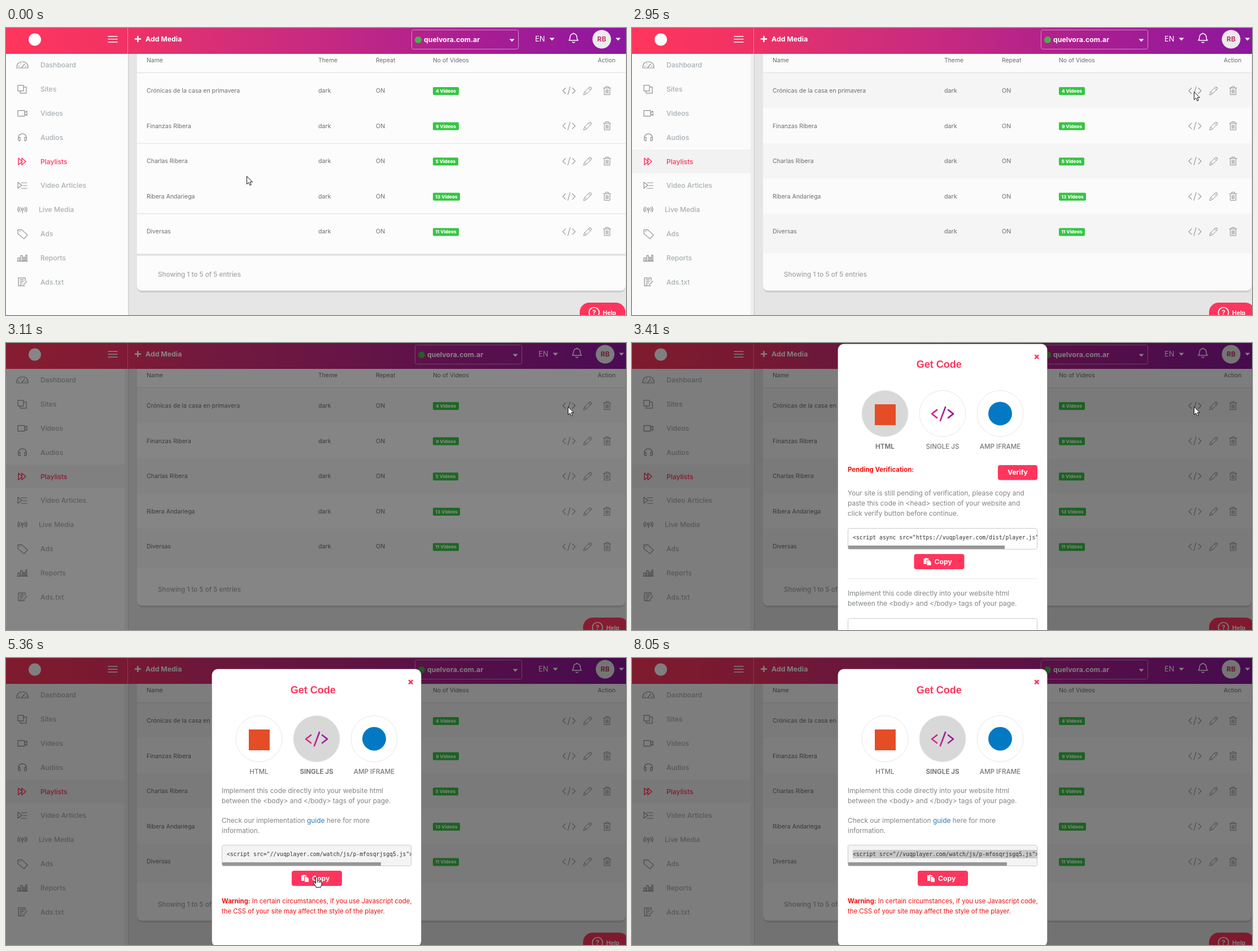
An HTML page for the animation above (8.33 s loop, 1098 px wide and 510 px high).

```html
<!DOCTYPE html>
<html lang="en">
<head>
<meta charset="utf-8">
<title>Playlists</title>
<style>
  html, body { margin: 0; width: 100%; height: 100%; overflow: hidden; background: #e6e6e6; }
  svg { display: block; width: 1098px; height: 510px; font-family: Inter, "Open Sans", sans-serif; }
  text { white-space: pre; }
  .ln { fill: none; stroke-linecap: round; stroke-linejoin: round; }
</style>
</head>
<body>
<svg id="stage" viewBox="0 0 1098 510"></svg>
<script>
const LOOP = 8330;
const RED = '#ff355d', GREY = '#8f9193';

const text = (x, y, s, size, fill, weight = 400, extra = '') =>
  `<text x="${x}" y="${y}" font-size="${size}" fill="${fill}" font-weight="${weight}" ${extra}>${s}</text>`;
const rect = (x, y, w, h, fill, r = 0, extra = '') =>
  `<rect x="${x}" y="${y}" width="${w}" height="${h}" fill="${fill}" rx="${r}" ${extra}/>`;
const line = (d, stroke = GREY, w = 1.2) =>
  `<path class="ln" d="${d}" stroke="${stroke}" stroke-width="${w}"/>`;
const disc = (x, y, r, fill, extra = '') =>
  `<circle cx="${x}" cy="${y}" r="${r}" fill="${fill}" ${extra}/>`;
const at = (x, y, s) => `<g transform="translate(${x} ${y})">${s}</g>`;
const group = (id, s) => `<g id="${id}">${s}</g>`;
const caret = (x, y) => `<path d="M${x - 4.5} ${y - 2.5}h9l-4.5 5z" fill="#fff"/>`;
const MID = 'text-anchor="middle"';

// Sidebar: label and icon strokes around the icon centre
const menu = [
  ['Dashboard', 'M-10 5q0-11 10-11t10 11zM-1 4l5-6M-7 2h2M5 2h2M-3-3v1'],
  ['Sites', 'M-8-7h10v10h-10zM-4 3v4h11v-11h-5'],
  ['Videos', 'M-8-5h12v10h-12zM4-1l4-3v8l-4-3'],
  ['Audios', 'M-7 3v-3a7 6.500 0 0 1 14 0v3M-7 0h3v6h-2q-2-1-1-6M7 0h-3v6h2q2-1 1-6'],
  ['Playlists', 'M-7-6v12l7-6zM-1-6l7 6-7 6M-1-6v5M-1 1v5'],
  ['Video Articles', 'M-8-6v11l7-5.500zM-2-5h10M1 0h7M-2 5h10'],
  ['Live Media', 'M0 0v6M-2-1a2 2 0 1 1 4 0a2 2 0 1 1-4 0M-4-4q-2.500 4 0 7M4-4q2.500 4 0 7M-6.500-5q-3 5 0 9M6.500-5q3 5 0 9'],
  ['Ads', 'M-8-7l7 0 10 9-6 7-11-9zM-5-4h1'],
  ['Reports', 'M-9 6h18M-8 6v-6h3v6M-3 6v-10h3v10M2 6v-7h2v7M6 6v-11h2v11'],
  ['Ads.txt', 'M5-2v-5h-12v14h11M-4-4h6M-4-1h6M-4 2h4M-4 5h2M2 5l6-6']
];
const sidebar = menu.map(([label, icon], i) => {
  const y = 66 + 42.8 * i, on = i === 4;
  return at(29, y, line(icon, on ? RED : GREY, on ? 1.5 : 1.2)) +
    text(i === 6 ? 58 : 61, y + 4.3, label, 12.1, on ? RED : '#a9b0b4', 500);
}).join('');

const rows = [
  ['Crónicas de la casa en primavera', 4, 46],
  ['Finanzas Ribera', 9, 46],
  ['Charlas Ribera', 5, 45],
  ['Ribera Andariega', 13, 48],
  ['Diversas', 11, 46]
];
const actions =
  line('M991-5l-5 5 5 5M1003-5l5 5-5 5M999-7l-4 14', GREY, 1.1) +
  line('M1023 7l1.500-5 9-9 3.500 3.500-9 9zM1031.500-5l3.500 3.500M1025 2l3 3M1035-7l2 2', GREY, 1) +
  line('M1058-5h13M1062-5v-2.500h5v2.500M1059.500-5v12h10v-12M1062.500-2v6.500M1064.500-2v6.500M1066.500-2v6.500', GREY, 1);
const table = rows.map(([name, n, w], i) => at(0, 111.5 + 62.6 * i,
  text(249, 3.5, name, 10.5, '#6d6d6d') +
  text(553, 3.5, 'dark', 10.7, '#6d6d6d') +
  text(655, 3.5, 'ON', 10.7, '#6d6d6d') +
  rect(756, -6.5, w, 14, '#36c643', 2) +
  text(756 + w / 2, 3.5, n + ' Videos', 8.2, '#fff', 800, MID) +
  actions)).join('');

const header =
  rect(0, 0, 1098, 46, 'url(#bar)') +
  rect(215, 0, 1, 46, '#f78aa6') +
  disc(51, 20.5, 11, '#fff') +
  line('M181 15h16M181 20h16M181 25h16', '#fff', 1.6) +
  line('M229 19.500h9M233.500 15v9', '#fff', 2.6) +
  text(247, 24, 'Add Media', 12.3, '#fff', 700) +
  group('tools',
    rect(718.5, 3.5, 189, 34, 'none', 3, 'stroke="#d68bd0"') +
    disc(730, 21, 6, '#4caf50') +
    text(740, 24.5, 'quelvora.com.ar', 12.3, '#fff', 700) +
    caret(896, 22) +
    text(937, 24, 'EN', 12.8, '#fff', 400) +
    caret(967, 20) +
    line('M997 22q2-2 2-6a6 6 0 0 1 12 0q0 4 2 6zM1003 25q2 2 4 0M1005 9v1', '#fff', 1.5) +
    disc(1055, 20, 16.5, '#ececec') +
    text(1055, 24.3, 'RB', 12, '#c03a6c', 700, MID) +
    caret(1084, 20));

const page =
  rect(0, 0, 1098, 510, '#e6e6e6') +
  rect(0, 46, 216, 464, '#fcfcfc') + rect(216, 46, 1.5, 464, '#d2d2d2') +
  group('tint', rect(0, 216, 210, 42, '#000', 0, 'opacity=".035"') +
    rect(210, 46, 6, 464, '#000', 0, 'opacity=".05"')) +
  sidebar +
  rect(232, 30, 865, 440, '#cdcdcd', 9) + rect(232, 30, 865, 436.5, '#fcfcfc', 8) +
  group('plain', [205, 330].map(y => rect(232, y - .5, 865, 1, '#e0e0e0')).join('') +
    rect(232, 401, 865, 4, '#e4e4e4')) +
  group('striped', [79, 205, 330].map(y =>
    rect(232, y, 865, y === 330 ? 70 : 62.5, '#000', 0, 'opacity=".022"')).join('')) +
  rect(232, 79, 865, 1, '#dcdcdc') +
  [[249, 'Name'], [553, 'Theme'], [655, 'Repeat'], [756, 'No of Videos'], [1048, 'Action']]
    .map(([x, s]) => text(x, 61, s, 10.4, '#6d6d6d')).join('') +
  table +
  text(269, 441.5, 'Showing 1 to 5 of 5 entries', 11.7, '#a3a5a7', 500) +
  header +
  group('help', rect(1016, 488, 81, 40, RED, 17) +
    disc(1041.5, 505.5, 9, 'none', 'stroke="#fff" stroke-width="1.6"') +
    text(1041.5, 510, '?', 12, '#fff', 600, MID) +
    text(1057, 509.5, 'Help', 10.4, '#fff', 700));

// Dialog
const para = (y, ...lines) =>
  lines.map((s, i) => text(382, y + 18 * i, s, 11.9, '#828486')).join('');
const codeBox = (y, h, fill, s, thumb, mark = '') =>
  rect(382.5, y + .5, 335, h, fill, 3, 'stroke="#c9c9c9"') +
  `<g clip-path="url(#codeClip)">${mark}${text(391, y + 20, s, 9.78, '#333', 400,
    'id="code' + y + '" font-family="DejaVu Sans Mono, monospace"')}</g>` +
  rect(383, y + h - 6, thumb, 6, '#969696');
const copyButton = (x, y, id) =>
  rect(x, y, 89, 27, RED, 4, `id="${id}"`) +
  at(x + 17, y + 7, `<path d="M0 1h3v-1h3v1h3v2h-4v8h-5z" fill="#fff"/><path d="M6 4h4l3 3v6h-7z" fill="#fff"/>`) +
  text(x + 36, y + 18.3, 'Copy', 12.2, '#fff', 700);
const body = ['Implement this code directly into your website html',
  'between the &lt;body&gt; and &lt;/body&gt; tags of your page.'];

const dialog =
  rect(364.5, 19.5, 371, 700, '#fff', 11, 'id="sheet" stroke="#000" stroke-opacity=".2"') +
  text(543.8, 62.5, 'Get Code', 18, RED, 700, MID + ' font-family="Liberation Sans, Arial, sans-serif"') +
  line('M714 40l5.500 5.500M719.500 40l-5.500 5.500', RED, 2.6) +
  [448, 550, 652].map((x, i) => disc(x, 143.5, 41, '#fff', `id="tab${i}" stroke="#e6e6e6"`)).join('') +
  rect(430, 127, 37, 37, '#e44d26') +
  line('M540 137l-9 7 9 7M560 137l9 7-9 7M555 132l-9 24', 'url(#ink)', 2.7) +
  disc(652, 143.5, 21, '#0379c4') +
  ['HTML', 'SINGLE JS', 'AMP IFRAME'].map((s, i) =>
    text(448 + 102 * i, 206, s, 11.6, '#77797b', 500, `${MID} id="label${i}"`)).join('') +
  group('pane0',
    text(382, 247.5, 'Pending Verification:', 11.4, '#f30d0d', 700) +
    rect(648, 235, 70, 26.500, RED, 4) + text(683, 252.5, 'Verify', 12, '#fff', 700, MID) +
    para(289, 'Your site is still pending of verification, please copy and',
      'paste this code in &lt;head&gt; section of your website and',
      'click verify button before continue.') +
    codeBox(347, 37, '#fff', '&lt;script async src="https://vuqplayer.com/dist/player.js"&gt;', 277) +
    copyButton(499.5, 393, 'copy0') +
    rect(382, 436.5, 336, 1, '#e4e4e4') +
    para(467, ...body) +
    rect(382.5, 507.5, 335, 37, '#fff', 3, 'stroke="#c9c9c9"')) +
  group('pane1',
    para(240, ...body) +
    para(292.5, 'Check our implementation <tspan fill="#2a7ab8">guide</tspan> here for more', 'information.') +
    codeBox(332, 37, '#f4f4f4', '&lt;script src="//vuqplayer.com/watch/js/p-mfosqrjsgq5.js"&gt;', 281,
      rect(391, 341, 327, 15, '#c8c8c8', 0, 'id="mark"')) +
    copyButton(506, 378, 'copy1') +
    text(382, 435.5, '<tspan font-weight="700">Warning:</tspan> In certain circumstances, if you use Javascript code,', 11.37, '#f30d0d') +
    text(382, 453.5, 'the CSS of your site may affect the style of the player.', 11.37, '#f30d0d'));

const stage = document.getElementById('stage');
stage.innerHTML = `<defs>
  <linearGradient id="bar">
    <stop offset="0" stop-color="#ff365c"/><stop offset=".2" stop-color="#ef3265"/>
    <stop offset=".3" stop-color="#db3074"/><stop offset=".5" stop-color="#c72a80"/>
    <stop offset=".75" stop-color="#aa1e92"/><stop offset="1" stop-color="#8d179f"/>
  </linearGradient>
  <linearGradient id="ink" gradientUnits="userSpaceOnUse" x1="531" y1="156" x2="569" y2="132">
    <stop offset="0" stop-color="#f0307a"/><stop offset=".6" stop-color="#a81f9a"/><stop offset="1" stop-color="#8b1a9e"/>
  </linearGradient>
  <clipPath id="codeClip"><rect x="383" y="300" width="335" height="100"/></clipPath>
</defs>` + page + rect(0, 0, 1098, 510, '#000', 0, 'id="dim"') +
  group('dialog', dialog) +
  group('cursor', `<path id="arrow" d="M.5.5v14l3.200-3 2.300 5 2.300-1-2.200-4.800h4.300z" fill="#fff" stroke="#111"/>
    <path id="hand" d="M-1.500 1.500a1.500 1.500 0 0 1 3 0V6.500q1.500-1 3 .4q1.600-.7 2.600.6q1.900-.4 1.900 1.500V13q0 2-1.500 4V18.500H-1V17L-5 12q-1-2 .6-2.400q1.200 0 2.900 2.200ZM1.500 7v3M4.500 7.500v3M7 8v2.500" fill="#fff" stroke="#111"/>`);

const el = {};
stage.querySelectorAll('[id]').forEach(e => el[e.id] = e);

// Pointer: time, x, y
const path = [
  [340, 426, 263], [430, 490, 260], [520, 620, 250], [600, 750, 213], [690, 880, 172], [770, 962, 146], [840, 985, 142],
  [1400, 985, 142], [1500, 900, 138], [1600, 650, 130], [1690, 470, 125], [1750, 432, 122], [1820, 577, 123],
  [1920, 800, 118], [2030, 960, 108], [2100, 1008, 104], [2210, 984, 114],
  [2270, 984, 114], [2330, 995, 113],
  [4060, 995, 113], [4160, 930, 122], [4300, 740, 146], [4430, 575, 154], [4500, 537, 154], [4560, 543, 152],
  [4730, 543, 152], [4820, 541, 166], [4980, 540, 235], [5160, 547, 330], [5360, 550, 389],
  [6980, 550, 389], [7080, 600, 400], [7220, 760, 440], [7340, 900, 480], [7460, 1050, 512]
];
const clamp = v => Math.max(0, Math.min(1, v));
const ramp = (t, a, b) => clamp((t - a) / (b - a));

function pointer(t) {
  const i = path.findIndex(p => p[0] > t);
  if (i === 0) return path[0].slice(1);
  if (i < 0) return path[path.length - 1].slice(1);
  const [a, b] = [path[i - 1], path[i]], k = ramp(t, a[0], b[0]);
  return [a[1] + (b[1] - a[1]) * k, a[2] + (b[2] - a[2]) * k];
}

const set = (id, name, value) => el[id].setAttribute(name, value);
const show = (id, on) => set(id, 'display', on ? 'inline' : 'none');

function draw(t) {
  const open = t >= 2950, tab = t >= 4710 ? 1 : 0;
  const [x, y] = pointer(t);
  const overTab = t > 4060 && Math.hypot(x - 550, y - 143.5) < 41;
  const overCopy = tab && x > 506 && x < 595 && y > 378 && y < 405;

  show('plain', !open);
  show('striped', open);
  show('tint', open);
  for (const id of ['tools', 'help']) set(id, 'transform', `translate(${open ? 6 : 0} 0)`);
  set('dim', 'opacity', .5 * ramp(t, 2950, 3120));

  const slide = 1 - (1 - ramp(t, 3150, 3580)) ** 2.4;
  set('dialog', 'transform', `translate(0 ${-170 * (1 - slide)})`);
  set('dialog', 'opacity', ramp(t, 3150, 3370));
  show('dialog', t > 3150);
  set('sheet', 'height', tab ? 494 : 700);

  for (let i = 0; i < 3; i++) {
    set('tab' + i, 'fill', i === tab ? '#d8d8d8' : i === 1 && overTab ? '#ececec' : '#fff');
    set('label' + i, 'font-weight', i === tab ? 700 : 500);
  }
  show('pane0', !tab);
  show('pane1', tab);

  const marked = t >= 6125, active = marked && t < 8050;
  show('mark', marked);
  set('mark', 'fill', active ? '#3297fd' : '#c8c8c8');
  set('code332', 'fill', active ? '#fff' : '#333');
  set('copy1', 'fill', t >= 6080 && t < 6170 ? '#e62c52' : RED);

  const hand = overTab || overCopy;
  show('hand', hand);
  show('arrow', !hand);
  set('cursor', 'transform', `translate(${Math.round(x)} ${Math.round(y)})`);
}

const start = performance.now();
function tick() {
  draw((performance.now() - start) % LOOP);
  requestAnimationFrame(tick);
}
tick();
</script>
</body>
</html>
```
